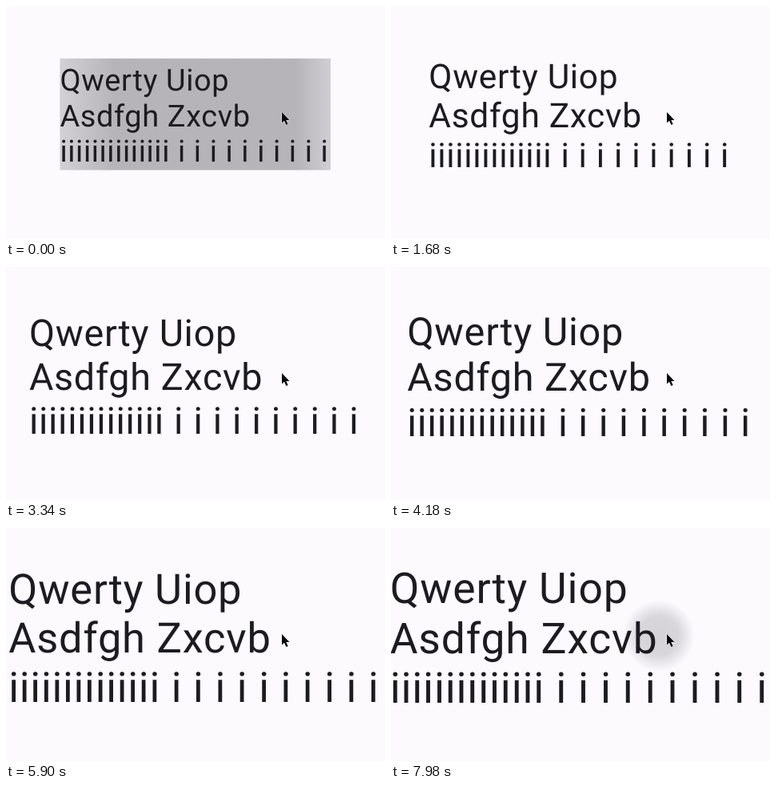
Write an HTML page that moves like this. It is 474 px wide and 292 px high and loops after 8000 ms.

```html
<!DOCTYPE html>
<html lang="en">
<head>
<meta charset="utf-8">
<title>Scaling text</title>
<style>
html, body { margin: 0; width: 100%; height: 100%; overflow: hidden; background: #fcfafd; }
svg { display: block; width: 100vw; height: 100vh; }
text { font: 400 100px Roboto, sans-serif; letter-spacing: 1.54px; fill: #1c1b20; text-rendering: geometricPrecision; }
stop { stop-color: #1c1b28; }
</style>
</head>
<body>
<svg viewBox="0 0 474 292">
  <defs>
    <linearGradient id="wash">
      <stop offset="0" stop-opacity=".25"/>
      <stop offset=".2" stop-opacity="1"/>
      <stop offset=".87" stop-opacity="1"/>
      <stop offset="1" stop-opacity=".3"/>
    </linearGradient>
    <radialGradient id="glow">
      <stop offset="0" stop-opacity=".18"/>
      <stop offset=".55" stop-opacity=".16"/>
      <stop offset=".8" stop-opacity=".07"/>
      <stop offset="1" stop-opacity="0"/>
    </radialGradient>
  </defs>
  <rect width="474" height="292" fill="#fcfafd"/>
  <g id="label">
    <rect id="base" fill="#1c1b28"/>
    <rect id="press" fill="url(#wash)"/>
    <text>Qwerty Uiop</text>
    <text>Asdfgh Zxcvb</text>
    <text>iiiiiiiiiiiiii i i i i i i i i i i</text>
  </g>
  <circle id="ripple" fill="url(#glow)"/>
  <path d="M345 133v13.5l3-2.8 2.4 5.3 2.3-1-2.4-5h4.2z" fill="#08080c" stroke="#fff" stroke-width="1" paint-order="stroke"/>
</svg>
<script>
const LOOP = 8000, CX = 236.7, CY = 135.7;
// Layout in units of 1/100 em
const WIDTH = 891, HEIGHT = 368, FIRST = 106.3, PITCH = 117.2;
const $ = id => document.getElementById(id);
const set = (el, attrs) => { for (const k in attrs) el.setAttribute(k, attrs[k]); };
const clamp = v => Math.min(1, Math.max(0, v));

document.querySelectorAll('text').forEach((el, i) => set(el, { y: FIRST + PITCH * i }));
for (const id of ['base', 'press']) set($(id), { width: WIDTH, height: HEIGHT });

// Grows ever more slowly, then rests
function fontSize(t) {
  const s = Math.min(t / 1000, 6.4);
  return 38 + 2.776 * s - .057 * s * s;
}

function draw(t) {
  const k = fontSize(t) / 100;
  set($('label'), { transform: `translate(${CX - WIDTH * k / 2} ${CY - HEIGHT * k / 2}) scale(${k})` });

  // The press fades first, then the even tint below it
  set($('press'), { opacity: .2 * clamp(1 - t / 900) });
  set($('base'), { opacity: .145 * clamp((1580 - t) / 500) });

  const p = clamp((t - 7540) / 440);
  set($('ripple'), { cx: 345 - 10 * p, cy: 141 - 6 * p, r: p ? 12 + 33 * p : 0, opacity: p });
}

function tick(now) {
  draw(now % LOOP);
  requestAnimationFrame(tick);
}
draw(0);
requestAnimationFrame(tick);
</script>
</body>
</html>
```
